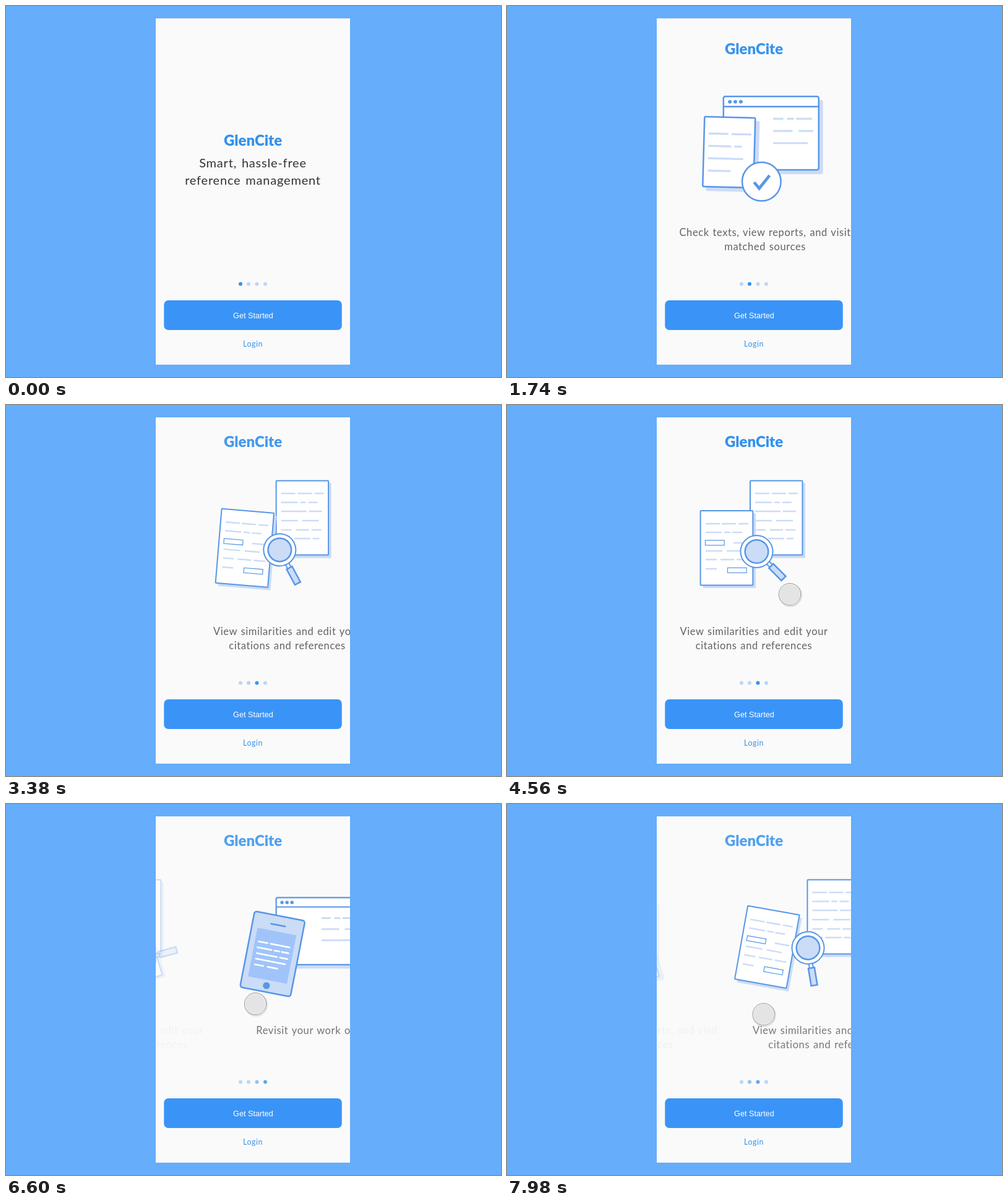
An HTML page that plays this animation: 800 px wide and 600 px high, repeating every 8000 ms.

```html
<!DOCTYPE html>
<html lang="en">
<head>
<meta charset="utf-8">
<title>Onboarding</title>
<style>
html, body { margin: 0; width: 100%; height: 100%; overflow: hidden; background: #66adfb; }
svg { display: block; width: 800px; height: 600px; }
text { font-family: Lato, "Open Sans", sans-serif; text-anchor: middle; }
.name { font-size: 24px; font-weight: 900; fill: #3391ee; }
.lead { font-size: 20px; letter-spacing: .8px; word-spacing: 2px; fill: #333; }
.copy { font-size: 16.5px; letter-spacing: .6px; word-spacing: 1px; fill: #636363; }
.login { font-size: 12.5px; letter-spacing: .5px; fill: #3a93e8; }
.start { font-family: "Liberation Sans", Arial, sans-serif; font-size: 12.7px; fill: #fff; }
.box { fill: #fff; stroke: #5896e6; stroke-width: 2.5; }
.thin { stroke-width: 2; }
.tag { fill: #fff; stroke: #5896e6; stroke-width: 1.2; }
.tint { fill: #cbdcf7; }
.solid { fill: #5896e6; }
.edge { fill: none; stroke: #5896e6; stroke-width: 2.5; }
.row { fill: none; stroke: #cbdcf7; stroke-width: 3.2; }
.slim { stroke-width: 2.4; }
.white { stroke: #fff; stroke-width: 2.6; stroke-linecap: round; }
</style>
</head>
<body>
<svg viewBox="0 0 800 600">
  <defs><clipPath id="clip"><rect x="242" y="20" width="314" height="560"/></clipPath></defs>
  <rect width="800" height="600" fill="#66adfb"/>
  <rect x="242" y="20" width="314" height="560" fill="#fafafa"/>
  <g clip-path="url(#clip)">
    <g id="art"></g>
    <g id="copy">
      <g><text class="lead" x="399" y="261">Smart, hassle-free</text><text class="lead" x="399" y="289">reference management</text></g>
      <g><text class="copy" x="399" y="372">Check texts, view reports, and visit</text><text class="copy" x="399" y="395">matched sources</text></g>
      <g><text class="copy" x="399" y="372">View similarities and edit your</text><text class="copy" x="399" y="395">citations and references</text></g>
      <g><text class="copy" x="399" y="372">Revisit your work on the go</text></g>
    </g>
    <text id="name" class="name" x="399">GlenCite</text>
    <g id="dots"></g>
    <rect x="255.3" y="476" width="287.5" height="48" rx="7" fill="#3a94f7"/>
    <text class="start" x="399.5" y="504.5">Get Started</text>
    <text class="login" x="399" y="551">Login</text>
    <g id="touch">
      <circle cx="1" cy="1.5" r="18" fill="none" stroke="#000" stroke-opacity=".13" stroke-width="2"/>
      <circle r="17.6" fill="#e1e1e1" fill-opacity=".86" stroke="#999" stroke-width="1"/>
      <circle r="16.5" fill="none" stroke="#fff" stroke-opacity=".65" stroke-width="1"/>
    </g>
  </g>
</svg>
<script>
const LOOP = 8000, WIDTH = 314;
const $ = id => document.getElementById(id);
const clamp = v => Math.max(0, Math.min(1, v));

// rows: [y, x1, x2, x1, x2, ...]
const rows = (list, cls = '') => '<path class="row ' + cls + '" d="' + list.map(([y, ...xs]) =>
  xs.map((x, i) => (i % 2 ? 'H' + x : `M${x} ${y}`)).join('')).join('') + '"/>';
const rect = (cls, x, y, w, h, r = 0) =>
  `<rect class="${cls}" x="${x}" y="${y}" width="${w}" height="${h}" rx="${r}"/>`;
const disc = (cls, x, y, r) => `<circle class="${cls}" cx="${x}" cy="${y}" r="${r}"/>`;

const browser = rect('tint', 340, 151, 157, 122, 3) + rect('box', 333.5, 145.2, 156.5, 120.8, 3) +
  '<path class="edge" d="M333.5 162H490"/>' +
  [344, 353, 362].map(x => disc('solid', x, 154, 3)).join('') +
  rows([[182, 415, 432, 438, 449, 453, 479], [202, 415, 447, 457, 481], [222, 415, 472]]);

const sheet = rect('tint', 313, 185, 84, 115, 2) + rect('box', 307.7, 180, 82, 113, 2) +
  rows([[207, 315, 347, 352, 384], [227, 315, 352, 357, 369], [247, 315, 372], [267, 315, 352]]);

const check = disc('box', 399, 284, 31.3) +
  '<path class="edge" style="stroke-width:4.6" d="M387 285L395.3 295L412 274"/>';

const report = rect('tint', 398, 126, 84, 121.5, 1) + rect('box thin', 393, 122.5, 84.5, 120, 1) +
  rows([[143, 401, 424, 428, 451, 455, 470], [157.5, 401, 428, 432, 441, 445, 460],
    [172, 401, 442, 446, 467], [187, 401, 428, 435, 462],
    [202, 401, 418, 425, 446, 450, 466], [216, 401, 418, 422, 448, 452, 463]], 'slim');

const draft = rect('tint', 317, 175, 85, 121, 1) + rect('box thin', 312.6, 171, 84.8, 120.5, 1) +
  rows([[192, 321, 344, 347, 370, 374, 390], [206, 321, 347, 351, 361, 364, 380], [223, 366, 390],
    [236, 321, 348, 355, 380], [250, 321, 339, 345, 367, 371, 390], [265, 321, 339]], 'slim') +
  rect('tag', 320.5, 218.8, 30.7, 8) + rect('tag', 356.5, 263.3, 30.7, 8);

const lens = '<g transform="translate(403.5 237) rotate(45)">' +
  rect('box thin', 25, -3, 9, 6) + rect('tint', 33, -5, 28.5, 10) +
  rect('edge', 33, -5, 28.5, 10) + disc('box thin', 0, 0, 26) + disc('tint', 0, 0, 18.8) +
  '<circle class="edge thin" r="18.8"/></g>';

const phone = '<g transform="translate(367 242.5)">' + rect('tint', -41.5, -62.5, 83, 125, 4) +
  rect('edge', -41.5, -62.5, 83, 125, 4) + '<path class="edge" d="M-12.5 -47.5H12.5"/>' +
  '<rect x="-32" y="-37" width="64" height="80" fill="#a0c4fa"/>' + disc('solid', 0, 52.2, 5.6) +
  rows([[-15.6, -26, -11, -6, 25], [-6, -26, -3, 2, 10, 14, 25], [3.5, -25, 8, 13, 25],
    [12.5, -25, 23], [22, -25, -11, -4, 12]], 'white') + '</g>';

// k: share of the page shift, turn: degrees per page, shrink: scale lost per page
const parts = [
  { page: 1, svg: browser, cx: 411.5, cy: 206, k: .83, turn: 0, shrink: .28 },
  { page: 1, svg: sheet, cx: 348.7, cy: 236.5, k: .556, turn: 27, shrink: 0 },
  { page: 1, svg: check, cx: 399, cy: 284, k: .68, turn: 0, shrink: 0 },
  { page: 2, svg: report, cx: 435, cy: 182, k: .786, turn: 0, shrink: 0 },
  { page: 2, svg: draft, cx: 355, cy: 231, k: .556, turn: 27, shrink: 0 },
  { page: 2, svg: lens, cx: 414.5, cy: 248, k: .634, turn: 95, shrink: 0 },
  { page: 3, svg: browser, cx: 411.5, cy: 206, k: .83, turn: 0, shrink: .28 },
  { page: 3, svg: phone, cx: 367, cy: 242.5, k: .556, turn: 30, shrink: 0 }
];
$('art').innerHTML = parts.map(p => `<g>${p.svg}</g>`).join('');
parts.forEach((p, i) => { p.el = $('art').children[i]; });

const dotX = [379, 392, 405.5, 419];
$('dots').innerHTML = dotX.map(x => disc('', x, 449.5, 3)).join('');
const dots = [...$('dots').children], copies = [...$('copy').children];

// show, drag and release times, settle end, pages, dragged share, touch path
const swipes = [
  { show: 420, drag: 700, free: 1260, end: 1950, from: 0, to: 1, part: .37, a: [503, 330], b: [387, 330] },
  { show: 2360, drag: 2600, free: 3080, end: 3720, from: 1, to: 2, part: .37, a: [430, 353], b: [314, 345] },
  { show: 4400, drag: 4600, free: 5000, end: 5650, from: 2, to: 3, part: .37, a: [457, 306], b: [341, 318] },
  { show: 5880, drag: 6160, free: 6660, end: 7300, from: 3, to: 2, part: .378, a: [289, 325], b: [407, 323] },
  { show: 7420, drag: 7580, free: 8020, end: 8600, from: 2, to: 1, part: .382, a: [297, 336], b: [417, 340] }
];
const sine = x => (1 - Math.cos(Math.PI * clamp(x))) / 2;
const out = x => 1 - (1 - clamp(x)) ** 2;

function state(t) {
  let pos = 0, touch = null;
  for (const s of swipes) {
    if (t < s.show) break;
    const d = sine((t - s.drag) / (s.free - s.drag));
    const share = s.part * d + (1 - s.part) * out((t - s.free) / (s.end - s.free));
    pos = s.from + (s.to - s.from) * share;
    touch = {
      x: s.a[0] + (s.b[0] - s.a[0]) * d,
      y: s.a[1] + (s.b[1] - s.a[1]) * d,
      alpha: Math.min(clamp((t - s.show) / 120), clamp((s.free + 140 - t) / 140))
    };
  }
  return { pos, touch };
}

function mix(w) {
  const a = [187, 215, 243], b = [52, 145, 238];
  return `rgb(${a.map((v, i) => Math.round(v + (b[i] - v) * w))})`;
}

function draw(t) {
  const { pos, touch } = state(t);
  for (const p of parts) {
    const u = p.page - pos, d = Math.abs(u);
    const alpha = u > 0 ? clamp((.61 - d) / .2) : clamp((.74 - d) / .36);
    const dx = u * WIDTH * p.k * (u < 0 ? 1.45 : 1);
    p.el.setAttribute('opacity', alpha);
    p.el.setAttribute('transform', `translate(${p.cx + dx} ${p.cy}) rotate(${u * p.turn}) ` +
      `scale(${Math.max(.1, 1 - d * p.shrink)}) translate(${-p.cx} ${-p.cy})`);
  }
  copies.forEach((el, i) => {
    const u = i - pos;
    el.setAttribute('transform', `translate(${u * WIDTH} 0)`);
    el.setAttribute('opacity', u > 0 ? clamp((.65 - u) / .32) : clamp(1 + 1.5 * u));
  });
  dots.forEach((el, i) => {
    el.setAttribute('fill', mix(1 - sine(Math.abs(i - pos))));
  });
  const name = $('name');
  name.setAttribute('y', 225.5 - 158 * clamp(pos) ** 1.13);
  name.setAttribute('opacity', 1 - .17 * Math.abs(Math.sin(Math.PI * pos)));
  $('touch').setAttribute('opacity', touch ? touch.alpha : 0);
  if (touch) $('touch').setAttribute('transform', `translate(${touch.x} ${touch.y})`);
}

function tick() {
  draw(performance.now() % LOOP);
  requestAnimationFrame(tick);
}
tick();
</script>
</body>
</html>
```
